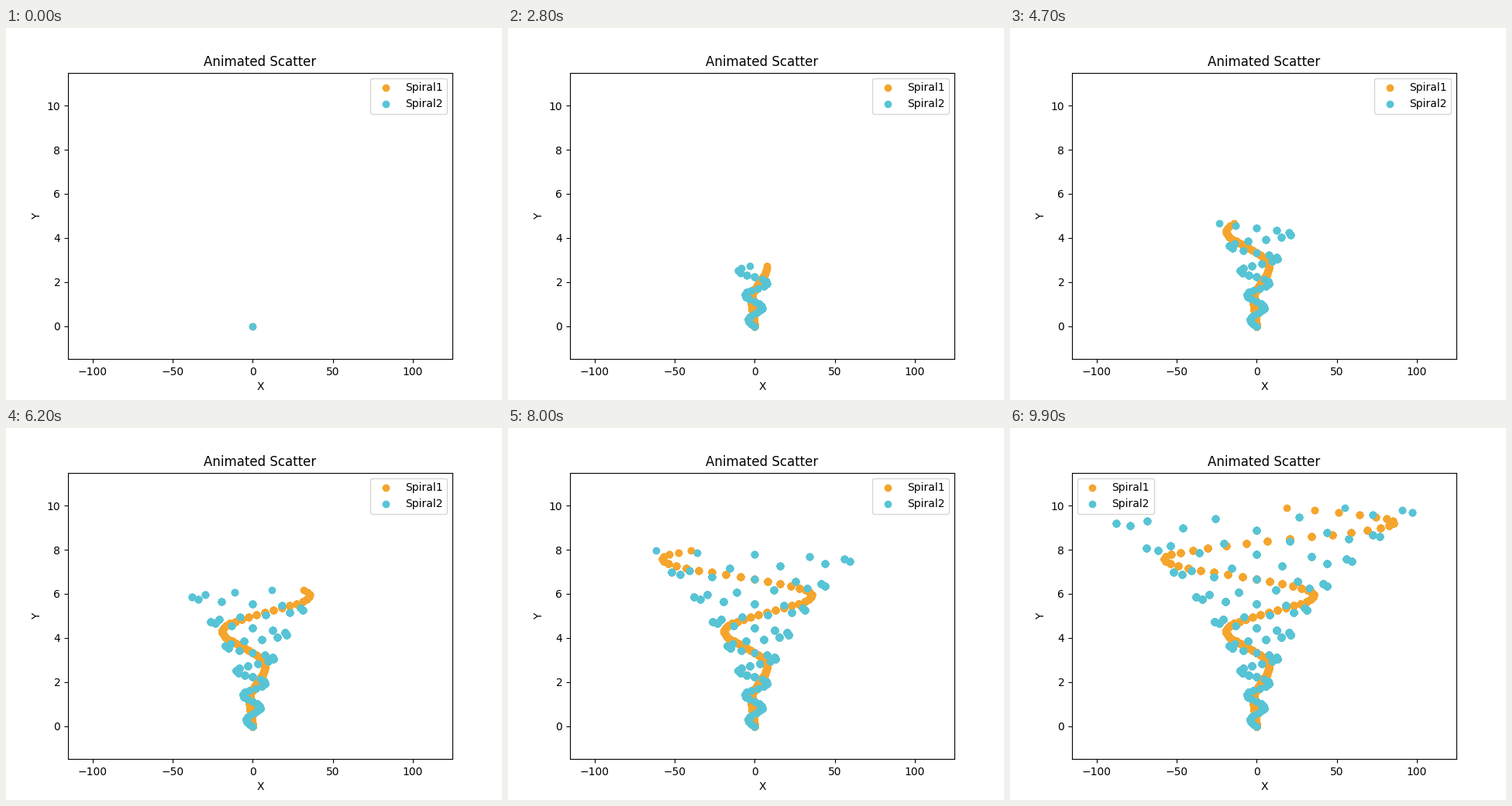
Write a matplotlib script that moves like this. It is 640 by 480 pixels and loops after 10000 ms.

```python
import numpy as np
import matplotlib.pyplot as plt
from matplotlib.animation import FuncAnimation

N = 100
ORANGE, CYAN = "#f5a52d", "#57c4d5"
EMPTY = np.empty((0, 2))

y = np.linspace(0, 10, N)


def spiral(turns, base):
    """Points of a sine whose amplitude grows with height."""
    theta = np.linspace(-turns * np.pi, turns * np.pi, N)
    return np.column_stack([(y**2 + base) * np.sin(theta), y])


def padded(values, margin=0.15):
    lo, hi = values.min(), values.max()
    pad = margin * (hi - lo)
    return lo - pad, hi + pad


spirals = [
    (spiral(3, 1), ORANGE, "Spiral1"),
    (spiral(9, 4), CYAN, "Spiral2"),
]

fig, ax = plt.subplots(figsize=(6.4, 4.8), dpi=100)

for pts, color, label in spirals:
    ax.scatter(*pts[:1].T, color=color, label=label)

# Every step stacks one more pair of layers, so older dots get crisper edges.
layers = [
    (step, pts, ax.scatter([], [], color=color))
    for step in range(1, N)
    for pts, color, _ in spirals
]

ax.set_xlim(*padded(np.concatenate([pts[:, 0] for pts, _, _ in spirals])))
ax.set_ylim(*padded(y))
ax.set_title("Animated Scatter")
ax.set_xlabel("X")
ax.set_ylabel("Y")
ax.legend(loc="best")  # jumps to the left once dots reach its corner


def update(frame):
    for step, pts, layer in layers:
        layer.set_offsets(pts[:step] if step <= frame else EMPTY)
    return [layer for _, _, layer in layers]


anim = FuncAnimation(fig, update, frames=N, interval=100, repeat=True,
                     repeat_delay=0, blit=False)
plt.show()
```
